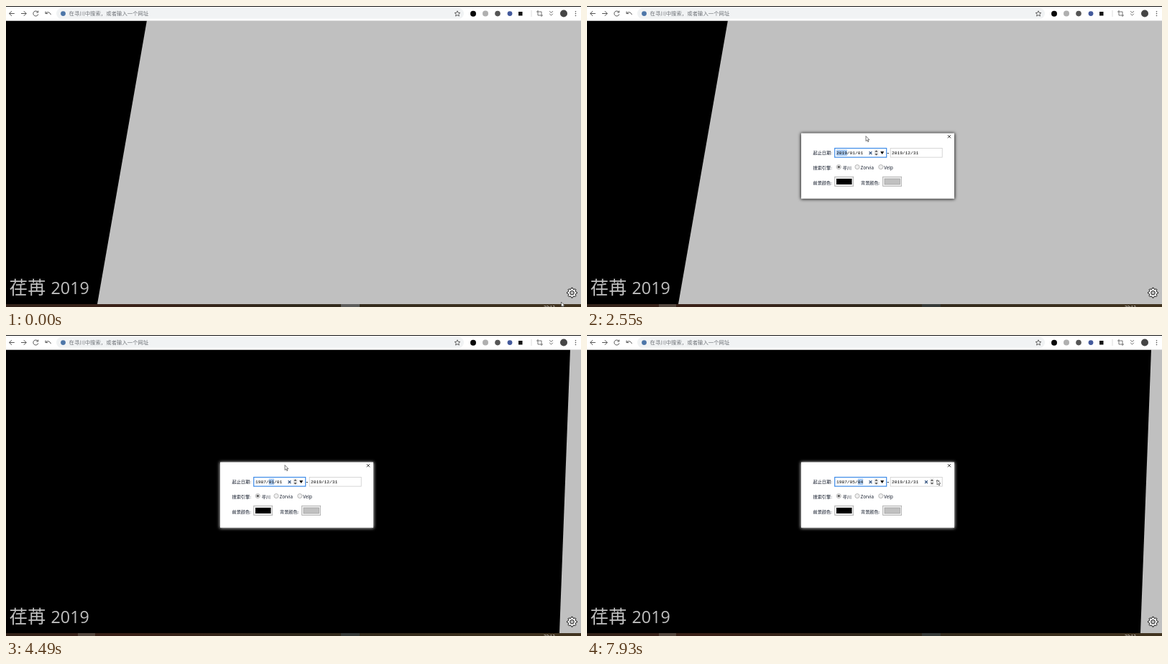
Animation of 800 by 420 pixels, one loop 8000 ms. Source, as an HTML page:

```html
<!DOCTYPE html>
<html lang="zh">
<head>
<meta charset="utf-8">
<style>
html, body { margin: 0; width: 100%; height: 100%; overflow: hidden; background: #c0c0c0; }
svg { display: block; width: 800px; height: 420px; }
text { font-family: "Noto Sans CJK SC", "Noto Sans CJK", "Noto Sans", sans-serif; white-space: pre; }
.latin { font-family: "Open Sans", "Noto Sans", sans-serif; }
.date { font: 6.2px "Liberation Mono", "Noto Sans Mono", monospace; }
.label { font-size: 6.2px; font-weight: 500; fill: #0c1424; }
.line { fill: none; stroke: #555; stroke-width: 1; }
</style>
</head>
<body>
<svg viewBox="0 0 800 420">
  <defs>
    <linearGradient id="bar">
      <stop offset="0" stop-color="#33231a"/><stop offset=".2" stop-color="#3b2118"/>
      <stop offset=".5" stop-color="#30291c"/><stop offset="1" stop-color="#41331f"/>
    </linearGradient>
    <filter id="blur" x="-10%" y="-20%" width="120%" height="140%"><feGaussianBlur stdDeviation="2.2"/></filter>
    <g id="controls">
      <path d="M392.6 203.2l3.8 3.8m0-3.8l-3.8 3.8" stroke="#31527f" stroke-width="1.2"/>
      <rect x="399.5" y="200" width="6" height="9.6" fill="#eee"/>
      <path d="M400.3 203.8l2.2-2.6 2.2 2.6zm0 2.2l2.2 2.6 2.2-2.6z" fill="#555"/>
    </g>
  </defs>

  <rect width="800" height="420" fill="#c0c0c0"/>
  <path id="shade"/>
  <text x="4.5" y="402" font-size="25.5" font-weight="300" fill="#c0c0c0">荏苒</text>
  <text class="latin" x="62.5" y="402" font-size="23.3" fill="#c0c0c0">2019</text>
  <path id="gear" fill="#fff" stroke="#111" stroke-width="1" stroke-linejoin="round" fill-rule="evenodd"/>

  <!-- browser toolbar -->
  <rect width="800" height="20.5" fill="#fff"/>
  <rect width="800" height="1" fill="#111"/>
  <rect y="20" width="800" height=".6" fill="#ddd"/>
  <rect x="70" y="3" width="567" height="14.8" rx="7.4" fill="#f1f3f4"/>
  <g class="line">
    <path d="M11.8 10.5H4.6m3.4-3.4l-3.4 3.4 3.4 3.4"/>
    <path d="M21 10.5h7.2m-3.4-3.4l3.4 3.4-3.4 3.4"/>
    <path d="M44.2 8.4a3.5 3.5 0 1 0 .6 3M44.8 6.6v2.4h-2.5"/>
    <path d="M55 7.6v3h3m-3 0c2-3 6-2.4 7.4 1.6"/>
    <path d="M628 6.8l1.1 2.5 2.7.3-2 1.8.6 2.7-2.4-1.4-2.4 1.4.6-2.7-2-1.8 2.7-.3z" stroke-width=".9"/>
    <path d="M740 6v7h7M738 8h7v7" stroke-width=".8"/>
    <path d="M756.2 7.2l2.3 2.3 2.3-2.3m-4.6 3.6l2.3 2.3 2.3-2.3" stroke-width=".9"/>
    <path d="M731 6v9" stroke="#ddd"/>
  </g>
  <g fill="#555"><circle cx="792.5" cy="7.7" r=".8"/><circle cx="792.5" cy="10.6" r=".8"/><circle cx="792.5" cy="13.5" r=".8"/></g>
  <circle cx="79.5" cy="10.6" r="3.4" fill="#4d76a8"/>
  <circle cx="650" cy="10.8" r="4" fill="#080808"/>
  <circle cx="667" cy="10.6" r="4" fill="#b0b0b0"/>
  <circle cx="684" cy="10.6" r="3.8" fill="#555"/>
  <circle cx="701" cy="10.6" r="3.4" fill="#43599b"/>
  <rect x="713" y="8" width="5.5" height="5.5" fill="#111"/>
  <circle cx="776" cy="10.5" r="5" fill="#454545"/>
  <text x="87.5" y="13.2" font-size="7.4" fill="#6f7378">在寻川中搜索，或者输入一个网址</text>

  <!-- taskbar -->
  <rect y="416" width="800" height="4" fill="url(#bar)"/>
  <rect id="taskA" x="100" y="416" width="24" height="4" fill="#55483f"/>
  <rect id="taskB" x="466" y="416" width="26" height="4"/>
  <text class="latin" x="748" y="423" font-size="6.2" fill="#eee">20:12</text>

  <g id="status">
    <rect x="-2" y="404.5" width="266.5" height="11.5" fill="#fff" stroke="#bbb" stroke-width=".7"/>
    <text class="latin" x="-3.2" y="412.3" font-size="6.5" fill="#444">chrome-extension://emdccdmkpdcjbbeifnhmjieikaibegjn/index.html###</text>
  </g>

  <g id="dialog">
    <rect id="glow" x="297.5" y="177.5" width="214" height="92" filter="url(#blur)"/>
    <rect x="298" y="177.5" width="213" height="91.3" fill="#fff"/>
    <path d="M501.9 180.1l4.2 4.2m0-4.2l-4.2 4.2" stroke="#222" stroke-width=".9"/>
    <text class="label" x="314.5" y="207.4">起止日期:</text>
    <text class="label" x="314.5" y="228">搜索引擎:</text>
    <text class="label" x="314.5" y="248.7">前景颜色:</text>
    <text class="label" x="381" y="248.7">背景颜色:</text>
    <rect id="field" x="344.7" y="198.5" width="72" height="12.6" fill="#fff"/>
    <rect x="422.2" y="198.5" width="72" height="12.6" fill="#fff" stroke="#ccc" stroke-width=".8"/>
    <path d="M417.6 205.5h2.4" stroke="#222" stroke-width=".8"/>
    <rect id="mark" y="200.5" height="8.6" fill="#a8c9f0"/>
    <text id="from" class="date" x="347" y="207.1"></text>
    <text class="date" x="424" y="207.1">2019/12/31</text>
    <g id="tools1"><use href="#controls"/><path d="M408.2 203h5l-2.5 4z"/></g>
    <g id="tools2" transform="translate(77.5)"><use href="#controls"/><path d="M408.2 203h5l-2.5 4z" fill="#777"/></g>
    <g fill="#eee" stroke="#aaa" stroke-width=".8">
      <circle cx="350.3" cy="224.6" r="3.1"/><circle cx="376" cy="224.6" r="3.1"/><circle cx="408.8" cy="224.6" r="3.1"/>
      <rect x="344.7" y="238.3" width="26" height="13.2"/><rect x="411.6" y="238.3" width="26" height="13.2"/>
    </g>
    <circle cx="350.3" cy="224.6" r="1.7" fill="#555"/>
    <rect x="347" y="241" width="21.5" height="8"/>
    <rect x="414" y="241" width="21.5" height="8" fill="#c0c0c0" stroke="#888" stroke-width=".5"/>
    <text class="label" x="355.6" y="228">寻川</text>
    <text class="label" x="380.6" y="228">Zorvia</text>
    <text class="label" x="413.3" y="228">Velp</text>
  </g>

  <path id="arrow" d="M0 0v7l1.6-1.5 1.2 2.6 1-.5-1.1-2.4h2.2z" fill="#fff" stroke="#222" stroke-width=".6"/>
  <path id="beam" d="M-1.5-4h3m-1.5 0v8m-1.5 0h3" class="line" stroke-width=".7"/>
</svg>
<script>
const LOOP = 8000;
const $ = id => document.getElementById(id);
const show = (id, on) => $(id).style.display = on ? "" : "none";
const set = (id, attrs) => { for (const k in attrs) $(id).setAttribute(k, attrs[k]); };
const latest = (list, t) => list.findLast(item => item[0] <= t);

// start, edge top x, edge bottom x, lag at top, lag at bottom
const edges = [
  [0, 196, 127, 0, 0],
  [3250, 794, 783, 42, 58],
  [3720, 785, 770, 19, 21],
  [5570, 785, 770, 31, 33],
  [6760, 785, 770, 31, 33]
];
const dates = [
  [0, "2019/01/01"], [3250, "0001/01/01"], [3410, "0019/01/01"], [3560, "0198/01/01"],
  [3720, "1987/01/01"], [5340, "1987/05/01"], [6530, "1987/05/04"]
];
// start, first character, length
const marks = [[0, 0, 0], [2160, 0, 4], [4490, 5, 2], [5570, 8, 2]];
// time, x, y
const pointer = [
  [0, 772.5, 413], [80, 772.5, 413], [390, 786, 401], [1000, 786, 401], [1470, 402, 214],
  [1630, 402, 207], [1860, 361, 207], [2390, 361, 207], [2550, 388, 181.5],
  [6900, 388, 181.5], [7530, 484, 201.5], [7610, 487, 202], [LOOP, 487, 202]
];

function gearPath() {
  let d = "";
  for (let i = 0; i < 32; i++) {
    const a = (i - 1.5) * Math.PI / 16, r = i % 4 === 1 || i % 4 === 2 ? 7 : 5.3;
    d += (i ? "L" : "M") + (787.5 + r * Math.cos(a)).toFixed(2) + " " + (400.2 + r * Math.sin(a)).toFixed(2);
  }
  return d + "ZM784.7 400.2a2.8 2.8 0 1 0 5.6 0a2.8 2.8 0 1 0-5.6 0Z";
}

function pointerAt(t) {
  const i = pointer.findIndex(p => p[0] > t);
  const [t0, x0, y0] = pointer[i - 1], [t1, x1, y1] = pointer[i];
  const k = (t - t0) / (t1 - t0);
  return [x0 + (x1 - x0) * k, y0 + (y1 - y0) * k];
}

function draw(t) {
  const [start, top, bottom, lagTop, lagBottom] = latest(edges, t);
  const age = t - start, lag = age < 390 ? Math.exp(-age / 150) : 0;
  set("shade", { d: `M0 20H${top - lagTop * lag}L${bottom - lagBottom * lag} 416H0Z` });

  const focused = t >= 2160, [, first, length] = latest(marks, t);
  $("from").textContent = latest(dates, t)[1];
  set("mark", { x: 347 + first * 3.72, width: length * 3.72 });
  set("field", { stroke: focused ? "#3d8be8" : "#ccc", "stroke-width": focused ? 1.2 : .8 });
  set("glow", { fill: t < 3250 ? "#111" : "#ddd" });
  set("taskB", { fill: t < 930 ? "#5c5c5a" : "#363a38" });

  show("dialog", t >= 930);
  show("status", t >= 550 && t < 1300);
  show("taskA", t >= 1470);
  show("tools1", t >= 1630);
  show("tools2", t >= 7450);

  const [x, y] = pointerAt(t), typing = t >= 1630 && t < 2450;
  show("beam", typing);
  show("arrow", !typing && (t < 930 || t >= 1000));
  set(typing ? "beam" : "arrow", { transform: `translate(${x} ${y})` });
}

set("gear", { d: gearPath() });
const begin = performance.now();
function tick() {
  draw((performance.now() - begin) % LOOP);
  requestAnimationFrame(tick);
}
tick();
</script>
</body>
</html>
```
